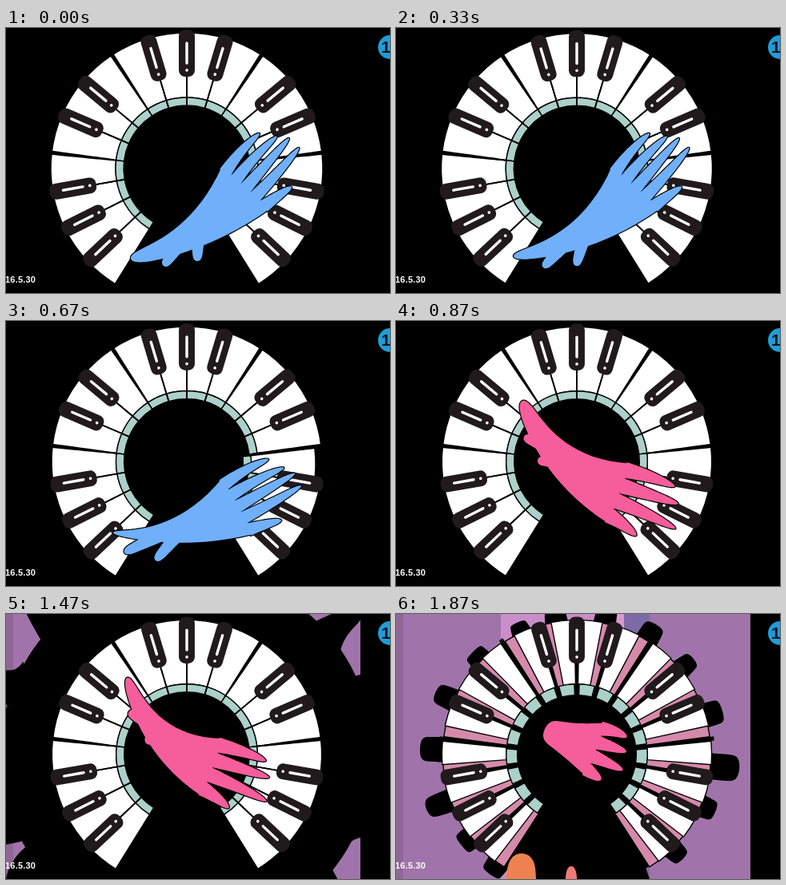
Animation, 480 px wide and 332 px high, one loop 1.94 s. Source, as an HTML page with a canvas:

```html
<!DOCTYPE html>
<html lang="en">
<head>
<meta charset="utf-8">
<title>Ring piano</title>
<style>
html, body { margin: 0; width: 100%; height: 100%; overflow: hidden; background: #000; }
#stage { position: relative; width: 480px; height: 332px; overflow: hidden; background: #000; }
canvas { position: absolute; left: 0; top: 0; }
.date, .badge span { position: absolute; font-family: "Liberation Sans", Arial, sans-serif; font-weight: bold; white-space: nowrap; }
.date { left: -1px; top: 308px; font-size: 11px; line-height: 14px; letter-spacing: .2px; color: #fff; }
.badge { position: absolute; left: 465px; top: 9px; width: 30px; height: 30px; border-radius: 50%; background: #209cd8; }
.badge span { left: 4px; top: 0; font-size: 21px; line-height: 30px; color: #08141c; }
</style>
</head>
<body>
<div id="stage">
  <canvas width="480" height="332"></canvas>
  <div class="date">16.5.30</div>
  <div class="badge"><span>1</span></div>
</div>
<script>
const ctx = document.querySelector('canvas').getContext('2d');
const LOOP = 1940, STEPS = 29, CX = 226, CY = 176, RAD = Math.PI / 180;
const KEYS = 18, START = 120, STEP = 300 / KEYS, TRIM = 1.8;
const GAPS = [4, 7, 11, 14];

const seg = (t, a, b) => Math.max(0, Math.min(1, (t - a) / (b - a)));
const smooth = u => u * u * (3 - 2 * u);
const lerp = (a, b, u) => a + (b - a) * u;
const mix = (a, b, u) => Array.isArray(a) ? a.map((v, i) => lerp(v, b[i], u)) : lerp(a, b, u);
const blend = (a, b, u) => Object.fromEntries(Object.keys(a).map(k => [k, mix(a[k], b[k], u)]));
const rand = i => Math.abs(Math.sin(i * 127.1 + 3.7) * 43758.5) % 1;
const polar = (deg, r) => [CX + r * Math.cos(deg * RAD), CY + r * Math.sin(deg * RAD)];
const bezier = (a, b, c, u) => mix(mix(a, b, u), mix(b, c, u), u);

// A bent, tapering shape with a rounded tip; all hands and tentacles are made of these.
function limb(root, bend, tip, w0, w1, power = 1) {
  const path = new Path2D(), left = [], right = [], n = 24;
  for (let i = 0; i <= n; i++) {
    const u = 1 - (1 - i / n) ** 2;
    const [x, y] = bezier(root, bend, tip, u);
    const dx = lerp(bend[0] - root[0], tip[0] - bend[0], u);
    const dy = lerp(bend[1] - root[1], tip[1] - bend[1], u);
    const w = lerp(w1, w0, (1 - u) ** power) * Math.sqrt(1 - u ** 14) / (Math.hypot(dx, dy) || 1);
    left.push([x - dy * w, y + dx * w]);
    right.unshift([x + dy * w, y - dx * w]);
  }
  for (const [x, y] of left.concat(right)) path.lineTo(x, y);
  path.closePath();
  return path;
}

function fillRect(color, x, y, w, h) {
  ctx.fillStyle = color;
  ctx.fillRect(x, y, w, h);
}

function fillLimb(color, ...args) {
  ctx.fillStyle = color;
  ctx.fill(limb(...args));
}

function room(t) {
  fillRect('#000', 0, 0, 480, 332);
  if (t < 1200) return;
  const late = seg(t, 1670, 1870), wide = 115 * (1 - seg(t, 1200, 1670));
  const rise = seg(t, 1540, 1870);
  ctx.save();
  ctx.beginPath();
  ctx.rect(0, 0, 443, 332);
  ctx.clip();
  fillRect('#a074aa', 0, 0, 443, 332);
  fillRect('#8f6696', 0, 0, 9, 332);
  fillRect('#cb8dc9', 131, 0, 134, 332);
  fillRect('#d79bd0', 265, 0, 20, 332);
  fillRect('#7f6aa8', 285, 0, 32, 332);

  const base = lerp(184, 167, late) + wide;
  ctx.fillStyle = '#000';
  ctx.beginPath();
  ctx.arc(CX, CY, base, 0, 7);
  ctx.fill();
  for (let i = 0; i < KEYS; i++) {
    const a = i * 20 + 6 * rand(i), side = Math.cos(a * RAD) ** 8;
    const reach = 181 + 12 * rand(i + 20) + 12 * side + 44 * (1 - late) + wide;
    const sway = a + (rand(i + 40) - 0.5) * 12 * (1 - late);
    fillLimb('#000', polar(a, base - 20), polar(sway, base + 10), polar(a, reach),
      lerp(32, 16, late), 10 + 4 * rand(i + 60) + 4 * side, 1.5);
  }
  fillLimb('#000', [CX, CY], [235, 260], [250, 380], 70, 70);
  const y = 358 - 58 * rise;
  fillLimb('#ed8250', [155, 380], [154, 360], [158, y], 24, 17);
  fillLimb('#ef7b78', [219, 380], [219, 360], [219, y + 16], 9, 7);
  ctx.restore();
}

function sector(a, b, r0, r1, fill) {
  ctx.beginPath();
  ctx.arc(0, 0, r1, a * RAD, b * RAD);
  ctx.arc(0, 0, r0, b * RAD, a * RAD, true);
  ctx.closePath();
  ctx.fillStyle = fill;
  ctx.fill();
  ctx.stroke();
}

function whiteKey(i, depth, press) {
  const inset = STEP * 0.06 * depth, side = STEP * 0.28 * depth;
  const a = START + STEP * i + inset + (i === 0 ? TRIM : 0);
  const b = START + STEP * (i + 1) - inset - (i === KEYS - 1 ? TRIM : 0);
  const left = i < KEYS / 2;
  ctx.save();
  if (i === 14) ctx.translate(-8 * press, 3 * press);
  ctx.strokeStyle = '#000';
  ctx.lineWidth = 1.4;
  if (depth > 0) sector(a, b, 88, 169, '#d68aaa');
  sector(left ? a + side : a, left ? b : b - side, 89, 170, '#fff');
  sector(a + inset, b - inset, 79 - 4 * depth, 89, '#acd1c9');
  ctx.restore();
}

function line(x0, x1, width, color) {
  ctx.beginPath();
  ctx.moveTo(x0, 0);
  ctx.lineTo(x1, 0);
  ctx.strokeStyle = color;
  ctx.lineWidth = width;
  ctx.stroke();
}

function divider(i) {
  ctx.save();
  ctx.rotate((START + STEP * i) * RAD);
  if (GAPS.includes(i)) {
    fillLimb('#000', [174, 0], [120, 0], [79, 0], 2.7, 0.8);
  } else {
    line(79, 120, 1.9, '#000');
    ctx.beginPath();
    ctx.roundRect(115, -10, 59, 20, 8);
    ctx.fillStyle = '#211a1d';
    ctx.fill();
    ctx.lineCap = 'round';
    line(132, 157, 3.4, '#fff');
    line(123, 123.1, 3.6, '#fff');
  }
  ctx.restore();
}

function keyboard(t) {
  const depth = seg(t, 1600, 1870) ** 2;
  const press = smooth(seg(t, 530, 660)) * (1 - seg(t, 720, 800));
  const size = 1 - 0.008 * seg(t, 0, 900);
  ctx.save();
  ctx.translate(CX, CY);
  ctx.scale(size, size);
  for (let i = 0; i < KEYS; i++) whiteKey(i, depth, press);
  for (let i = 1; i < KEYS; i++) divider(i);
  ctx.restore();
}

// Finger tips seen from the palm: angle off the hand's axis, distance.
const tips = [[-27, 70], [-10, 75], [0, 82], [12, 83], [48, 57]];

const up = { palm: [300, 200], turn: -49, size: 1, reach: 1, tail: [156, 289], thick: 9, drip: [197, 298], drop: [239, 292] };
const upThin = { ...up, tail: [147, 286], thick: 7, drip: [184, 300], drop: [225, 298] };
const down = { ...up, palm: [290, 232], turn: -30, tail: [134, 265], thick: 4, drip: [148, 290], drop: [187, 300] };
const low = { ...up, palm: [279, 216], turn: 20, tail: [158, 100], thick: 10, drip: [160, 145], drop: [177, 175] };
const lowThin = { ...low, tail: [156, 93], thick: 8, drip: [153, 134], drop: [168, 171] };
const back = { ...low, palm: [241, 173], size: 0.93, tail: [148, 69], thick: 7, drip: [154, 113], drop: [178, 148] };
const melted = { ...back, palm: [250, 170], size: 0.9, reach: 0.55, tail: [186, 144], thick: 15, drip: [200, 163], drop: [208, 172] };

const hands = [
  { color: '#70b0fa', fingers: tips, keys: [[0, up], [330, upThin], [400, upThin], [660, down], [800, down]] },
  { color: '#f65d9b', fingers: tips.filter((_, i) => i !== 2),
    keys: [[870, low], [1200, lowThin], [1240, lowThin], [1670, back], [1870, melted]] }];

function poseAt(keys, t) {
  let i = 0;
  while (i < keys.length - 2 && t >= keys[i + 1][0]) i++;
  const [[t0, a], [t1, b]] = [keys[i], keys[i + 1]];
  return blend(a, b, smooth(seg(t, t0, t1)));
}

function hand(t) {
  const { color, fingers, keys } = hands[t < 800 ? 0 : 1];
  const { palm, turn, size, reach, tail, thick, drip, drop } = poseAt(keys, t);
  const c = Math.cos(turn * RAD) * size, s = Math.sin(turn * RAD) * size;
  const place = (x, y) => [palm[0] + c * x - s * y, palm[1] + s * x + c * y];
  const span = Math.hypot(palm[0] - tail[0], palm[1] - tail[1]);
  const elbow = place(-0.55 * span / size, 0);
  const half = 40 / fingers.length;

  const parts = [limb(palm, elbow, tail, 40 * size, thick, 1.6)];
  fingers.forEach(([a, r], i) => {
    const y = -40 + half * (2 * i + 1);
    const tx = r * Math.cos(a * RAD) * reach, ty = lerp(y, r * Math.sin(a * RAD), reach);
    parts.push(limb(place(-3, y), place(tx * 0.5, y * 1.15), place(tx, ty), half * size, 2, 0.7));
  });
  [[drip, 0.58], [drop, 0.45]].forEach(([tip, u]) => {
    const root = bezier(palm, elbow, tail, u);
    parts.push(limb(root, mix(root, tip, 0.5), tip, 9, 5.5));
  });

  // Outlines first, then fills, so the parts join into one silhouette.
  ctx.lineJoin = 'round';
  ctx.lineWidth = 2.4;
  ctx.strokeStyle = '#000';
  ctx.fillStyle = color;
  for (const p of parts) ctx.stroke(p);
  for (const p of parts) ctx.fill(p);
}

// The picture holds still between steps, fifteen to the second.
function held(t) {
  const at = i => Math.round(i * 20 / 3) * 10;
  let i = STEPS - 1;
  while (at(i) > t) i--;
  return at(i);
}

function draw(now) {
  const t = held(Math.max(0, now - begin) % LOOP);
  room(t);
  keyboard(t);
  hand(t);
  requestAnimationFrame(draw);
}

const begin = performance.now();
draw(begin);
</script>
</body>
</html>
```
